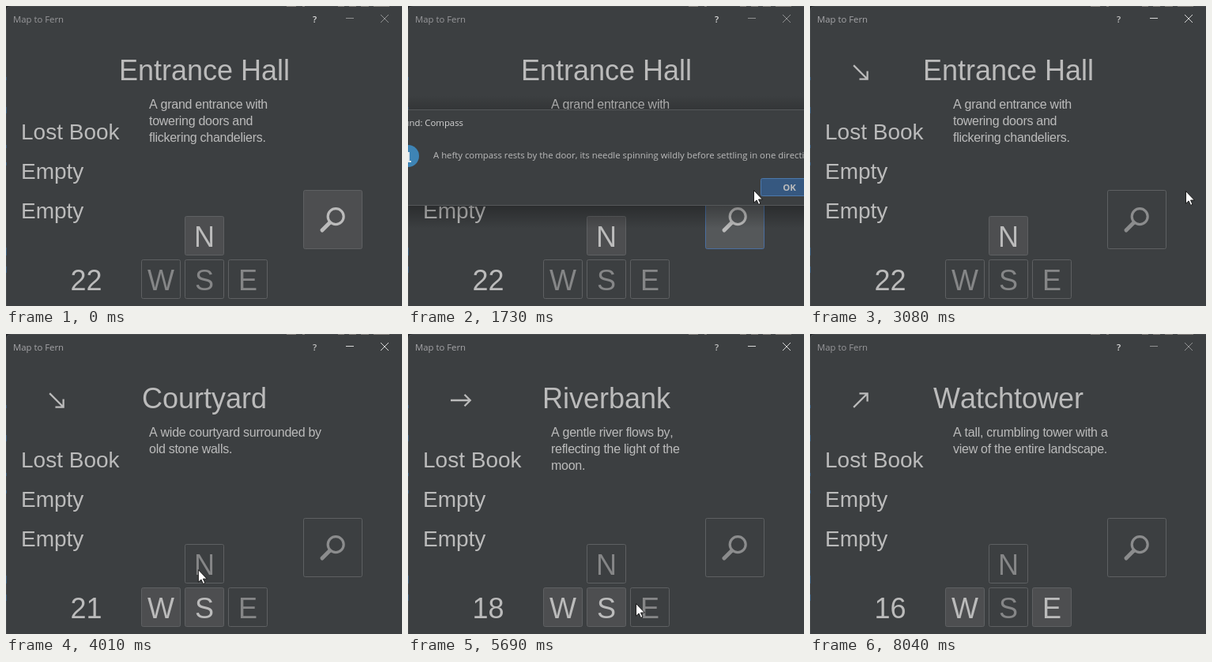
Write an HTML page that moves like this. It is 501 px wide and 380 px high and loops after 8110 ms.

```html
<!DOCTYPE html>
<html lang="en">
<head>
<meta charset="utf-8">
<title>Map to Fern</title>
<style>
  html, body { margin: 0; width: 100%; height: 100%; overflow: hidden; background: #3c3f41; }
  svg { display: block; width: 501px; height: 380px; }
  text { fill: #bbb; font-family: "Liberation Sans", Arial, sans-serif; font-kerning: none; white-space: pre; }
  .big { font-size: 36px; }
  .mid { font-size: 28px; }
  .story { font-size: 16px; letter-spacing: -.27px; }
  .ui { font-family: "Open Sans", "Noto Sans", sans-serif; font-size: 11.35px; }
  .center { text-anchor: middle; }
  .line { fill: none; stroke: #bbb; }
  .button rect { fill: #3c3f41; stroke: #5e6062; }
  .button text { fill: #858687; }
  .button .line { stroke: #8b8c8d; }
  .button.on rect { fill: #4d4e50; }
  .button.on text { fill: #bbb; }
  .button.on .line { stroke: #bbb; }
  .button.hover rect { fill: #55585a; stroke: #4a6ea0; }
</style>
</head>
<body>
<svg viewBox="0 0 501 380">
  <defs>
    <linearGradient id="shade" x2="0" y2="1">
      <stop offset="0" stop-color="#000" stop-opacity=".3"/>
      <stop offset="1" stop-color="#000" stop-opacity="0"/>
    </linearGradient>
  </defs>
  <rect width="501" height="380" fill="#3c3f41"/>
  <path d="M.5 380V7Q.5 .5 7 .5H501" fill="none" stroke="#484b4d"/>
  <path d="M0 0H6Q0 0 0 6Z" fill="#25282b"/>
  <path d="M355 .5h12m8 0h3m42 0h8m6 0h9m6 0h10m6 0h20" stroke="#85827e" fill="none"/>
  <path d="M.5 90v4m0 34v8m0 40v4m0 18v4m0 104v10m0 14v8" stroke="#40617f" fill="none"/>

  <text id="caption" class="ui" x="9" y="21">Map to Fern</text>
  <text id="help" class="ui center" x="390.5" y="20.5" font-weight="600">?</text>
  <path id="controls" class="line" d="M430 15.5H440M474 11L484 21M484 11L474 21"/>

  <path id="arrow" class="line" stroke-width="2.3" d="M-12.5 0H12M5 -7.2L12.2 0L5 7.2"/>
  <text id="title" class="big center" x="251" y="94"></text>
  <text class="story" id="story0" x="181" y="130"></text>
  <text class="story" id="story1" x="181" y="151"></text>
  <text class="story" id="story2" x="181" y="172"></text>
  <text class="mid" x="19" y="169">Lost Book</text>
  <text class="mid" x="19" y="219">Empty</text>
  <text class="mid" x="19" y="269">Empty</text>
  <text id="count" class="big center" x="101.5" y="360"></text>
  <g id="buttons"></g>

  <g id="dialog">
    <rect y="252" width="501" height="30" fill="url(#shade)"/>
    <rect y="-131" width="501" height="18" fill="url(#shade)" opacity=".5" transform="scale(1 -1)"/>
    <rect x="-60" y="131.5" width="620" height="121" fill="#3c3f41" stroke="#55585a"/>
    <text class="ui" x="70" y="152" text-anchor="end" style="fill:#d2d2d2">Found: Compass</text>
    <circle cx="0" cy="190" r="14" fill="#3e84b5"/>
    <path d="M-3 186H1V196M-3 197H4" fill="none" stroke="#dce6ec" stroke-width="2"/>
    <text class="ui" x="32" y="193">A hefty compass rests by the door, its needle spinning wildly before settling in one direction.</text>
    <rect x="446.5" y="218.5" width="73" height="22" rx="2" fill="#365880" stroke="#4c78ab"/>
    <text class="ui center" x="482.5" y="234" font-weight="bold">OK</text>
  </g>

  <g id="pointer">
    <circle id="press" r="12" fill="#b3ae2c" opacity=".95"/>
    <path d="M.5 .5V16.2L4.1 12.9L6.6 18.4L9 17.3L6.5 12H11.4Z" fill="#fff" stroke="#111" stroke-width=".9"/>
  </g>
</svg>
<script>
const LOOP = 8110;
const DIALOG_OPEN = 830, DIALOG_CLOSE = 3010;
const $ = id => document.getElementById(id);

const rooms = [
  { at: 0, moves: 22, name: "Entrance Hall", exits: "N",
    story: ["A grand entrance with", "towering doors and", "flickering chandeliers."] },
  { at: 3950, moves: 21, name: "Courtyard", exits: "SW",
    story: ["A wide courtyard surrounded by", "old stone walls."] },
  { at: 4345, moves: 20, name: "Forest", exits: "SE",
    story: ["An empty forest with not", "much around."] },
  { at: 4950, moves: 19, name: "Clearing", exits: "NE",
    story: ["A mossy clearing bathed in", "pale light."] },
  { at: 5620, moves: 18, name: "Riverbank", exits: "WS",
    story: ["A gentle river flows by,", "reflecting the light of the", "moon."] },
  { at: 6360, moves: 17, name: "Old Bridge", exits: "NE",
    story: ["A rickety wooden bridge", "sways over a deep chasm."] },
  { at: 7040, moves: 16, name: "Watchtower", exits: "WE",
    story: ["A tall, crumbling tower with a", "view of the entire landscape."] }
];

// Each stop: time, x, y of the pointer tip.
const path = [
  [140, 465, 374], [450, 414, 274], [1000, 414, 274], [1470, 432, 234],
  [1665, 432, 234], [1730, 437, 233], [2150, 480, 217], [2470, 472, 227],
  [2600, 472, 227], [2740, 475, 234], [3080, 475, 234], [3740, 250, 291],
  [3950, 250, 291], [4215, 197, 344], [4345, 197, 344], [4680, 239, 339],
  [4750, 240, 340], [5020, 240, 340], [5090, 242, 340], [5380, 242, 340],
  [5560, 288, 341], [5760, 288, 341], [6220, 250, 345], [6360, 250, 345],
  [6770, 315, 342], [6840, 316, 342], [7040, 316, 342], [7640, 408, 367]
];

const presses = [[760, 830], [2600, 2740], [3880, 3950], [4280, 4345],
  [4890, 4950], [5560, 5620], [6300, 6360], [6980, 7040]];

const lens = `<circle class="line" cx="417.2" cy="266.6" r="10" stroke-width="3.2"/>
  <path class="line" d="M409.5 274.5L400 284" stroke-width="5" stroke-linecap="round"/>`;

function makeButton(key, x, y, size) {
  const node = document.createElementNS("http://www.w3.org/2000/svg", "g");
  const label = key === "search" ? lens
    : `<text class="big center" x="${x + 25}" y="${y + 39}">${key}</text>`;
  node.innerHTML = `<rect x="${x + .5}" y="${y + .5}" width="${size - 1}" height="${size - 1}" rx="2"/>${label}`;
  $("buttons").append(node);
  const contains = (px, py) => px >= x && px < x + size && py >= y && py < y + size;
  return { key, node, contains };
}

const buttons = [
  makeButton("N", 226, 266, 50), makeButton("W", 171, 321, 50),
  makeButton("S", 226, 321, 50), makeButton("E", 281, 321, 50),
  makeButton("search", 376, 233, 75)
];

const within = (t, from, to) => t >= from && t < to;
const show = (node, visible) => node.setAttribute("visibility", visible ? "visible" : "hidden");

function pointerAt(t) {
  const next = path.findIndex(stop => stop[0] > t);
  if (next < 0) return path[path.length - 1].slice(1);
  if (next === 0) return path[0].slice(1);
  const [t0, x0, y0] = path[next - 1], [t1, x1, y1] = path[next];
  const u = (t - t0) / (t1 - t0), k = u * u * (3 - 2 * u);
  return [x0 + (x1 - x0) * k, y0 + (y1 - y0) * k];
}

function drawRoom(t) {
  const room = rooms.filter(r => r.at <= t).pop();
  $("title").textContent = room.name;
  $("count").textContent = room.moves;
  for (let i = 0; i < 3; i++) $("story" + i).textContent = room.story[i] || "";

  const angle = room.moves > 18 ? 45 : room.moves > 16 ? 0 : -45;
  $("arrow").setAttribute("transform", `translate(${angle ? 64 : 66.5} 84) rotate(${angle})`);
  show($("arrow"), t >= DIALOG_CLOSE);
  return room;
}

function drawButtons(t, room, x, y, pointerShown) {
  const modal = within(t, DIALOG_OPEN, DIALOG_CLOSE);
  for (const { key, node, contains } of buttons) {
    const search = key === "search";
    const on = search ? t < DIALOG_CLOSE : room.exits.includes(key);
    const hover = on && (modal ? search : pointerShown && contains(x, y));
    node.setAttribute("class", `button${on ? " on" : ""}${hover ? " hover" : ""}`);
  }
}

function drawFrame(t) {
  const active = within(t, 760, DIALOG_OPEN) || within(t, DIALOG_CLOSE, 8040);
  $("caption").style.fill = active ? "#a5a5a8" : "#98989b";
  $("help").style.fill = active ? "#c4c4c4" : "#dedede";
  $("controls").style.stroke = active ? "#d8d8d8" : "#909192";
}

function render(t) {
  const [x, y] = pointerAt(t);
  const pointerShown = within(t, 140, 7700);
  drawFrame(t);
  drawButtons(t, drawRoom(t), x, y, pointerShown);

  const dialog = $("dialog");
  show(dialog, within(t, DIALOG_OPEN, DIALOG_CLOSE));
  dialog.setAttribute("opacity", Math.min(1, .4 + Math.max(0, t - DIALOG_OPEN) / 220));

  $("pointer").setAttribute("transform", `translate(${x} ${y})`);
  show($("pointer"), pointerShown);
  show($("press"), pointerShown && presses.some(([from, to]) => within(t, from, to)));
}

const start = performance.now();
function tick(now) {
  render(Math.max(0, now - start) % LOOP);
  requestAnimationFrame(tick);
}
render(0);
requestAnimationFrame(tick);
</script>
</body>
</html>
```
